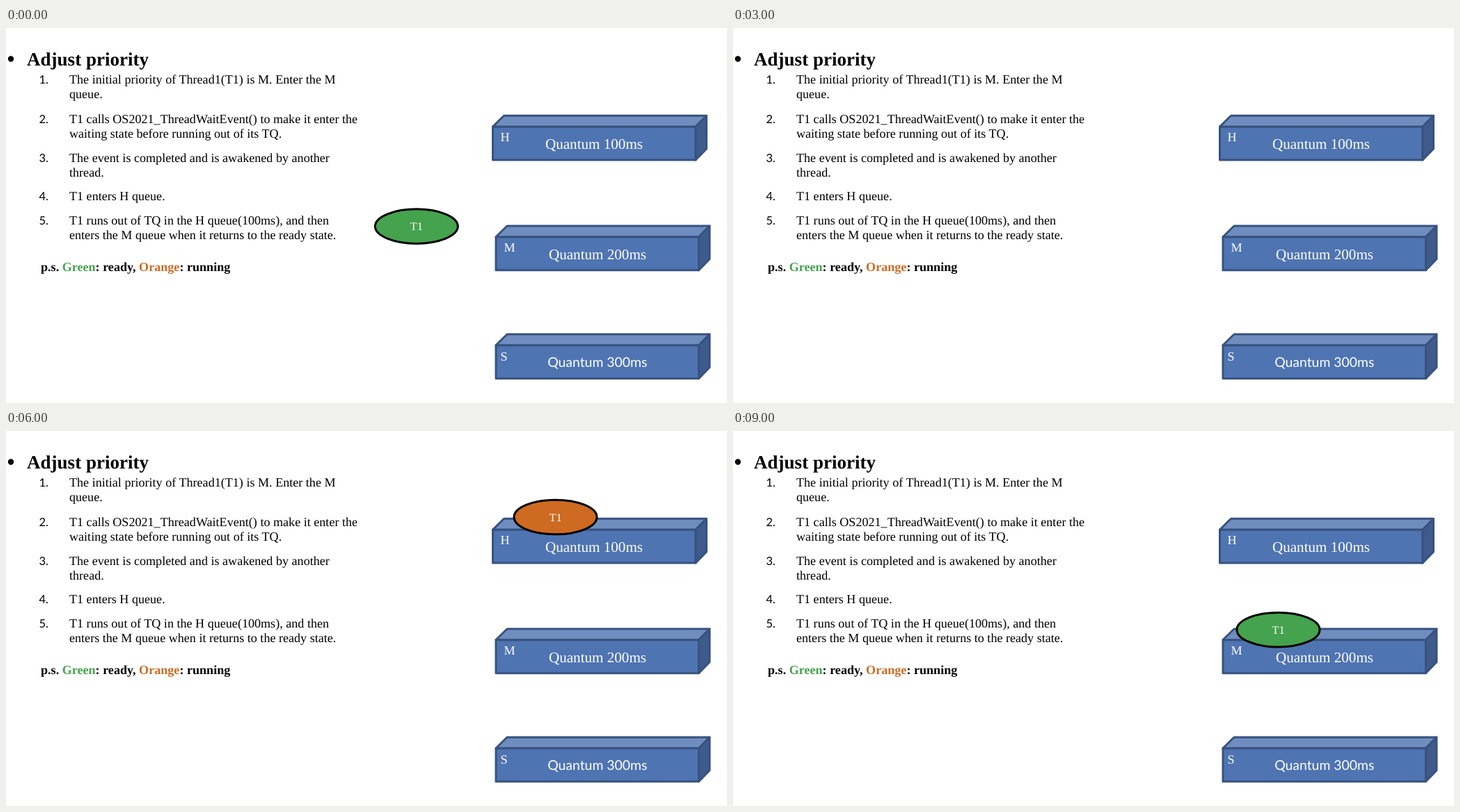
Recreate the animation shown at these times as an HTML page. Size 1036x540 px, loop 10000 ms.

```html
<!DOCTYPE html>
<html lang="en">
<head>
<meta charset="utf-8">
<title>Adjust priority</title>
<style>
  html, body { margin: 0; width: 100%; height: 100%; overflow: hidden; background: #fff; }
  svg { display: block; width: 1036px; height: 540px; text-rendering: geometricPrecision; }
  text { font-family: "Liberation Serif", "Times New Roman", serif; font-size: 18.1px; white-space: pre; }
  .sans { font-family: Lato, sans-serif; }
  .mid { text-anchor: middle; }
  .bold { font-weight: bold; }
</style>
</head>
<body>
<svg id="stage" viewBox="0 0 1036 540"></svg>
<script>
const GREEN = '#45a24e', ORANGE = '#ce6a22', GOLD = '#f4ba30', EDGE = '#38527f';
const stage = document.getElementById('stage');

function add(tag, attrs, parent = stage, content = '') {
  const el = document.createElementNS('http://www.w3.org/2000/svg', tag);
  for (const key in attrs) el.setAttribute(key, attrs[key]);
  el.textContent = content;
  parent.append(el);
  return el;
}

function label(x, y, content, { size = 18.1, fill = '#000', cls = '', parent = stage } = {}) {
  return add('text', { x, y, fill, class: cls, style: `font-size:${size}px` }, parent, content);
}

// Instructions
add('circle', { cx: 7, cy: 44.5, r: 4.2 });
label(30, 54, 'Adjust priority', { size: 27.05, cls: 'bold' });
[
  [79.7, 'The initial priority of Thread1(T1) is M. Enter the M', 'queue.'],
  [136.6, 'T1 calls OS2021_ThreadWaitEvent() to make it enter the', 'waiting state before running out of its TQ.'],
  [192.7, 'The event is completed and is awakened by another', 'thread.'],
  [248.2, 'T1 enters H queue.'],
  [282.5, 'T1 runs out of TQ in the H queue(100ms), and then', 'enters the M queue when it returns to the ready state.']
].forEach(([y, ...lines], i) => {
  label(47.5, y, `${i + 1}.`, { size: 16.5, cls: 'sans' });
  lines.forEach((line, n) => label(91, y + n * 21.7, line));
});
const note = label(50, 350, '', { cls: 'bold' });
[['p.s. '], ['Green', GREEN], [': ready, '], ['Orange', ORANGE], [': running']]
  .forEach(([part, fill = '#000']) => add('tspan', { fill }, note, part));

// Queues
function queue(x, y, name, nameX, nameY, quantum, textX, textY, font = {}) {
  const box = add('g', { transform: `translate(${x} ${y})`, stroke: EDGE, 'stroke-width': 3, 'stroke-linejoin': 'round' });
  add('path', { d: 'M0 0h291.5v48H0z', fill: '#4f74b2' }, box);
  add('path', { d: 'M0 0l16-15.7h291l-15.5 15.7z', fill: '#6f8ebf' }, box);
  add('path', { d: 'M291.5 0l15.5-15.7v47.7l-15.5 16z', fill: '#3f5b8b' }, box);
  label(nameX, nameY, name, { fill: '#fff' });
  label(textX, textY, quantum, { size: 21.1, fill: '#fff', cls: 'mid', ...font });
}
queue(699.5, 142, 'H', 710.5, 163, 'Quantum 100ms', 845, 174);
queue(704, 300.7, 'M', 715.5, 321.8, 'Quantum 200ms', 850, 332.7);
queue(704, 456.7, 'S', 710.5, 478.8, 'Quantum 300ms', 849.8, 488.3, { size: 19.4, cls: 'mid sans' });

// Thread
const thread = add('g', {});
const oval = add('ellipse', { rx: 59.5, ry: 24.8, stroke: '#000', 'stroke-width': 3 }, thread);
label(0, 5.6, 'T1', { size: 16.3, fill: '#fff', cls: 'mid', parent: thread });

// Star shape in thousandths of its width and height
const STAR = '500,269 672,0 655,247 851,206 773,339 977,377 815,485 1000,615 779,599 840,840 649,669 613,914 ' +
  '488,691 393,1000 357,723 220,816 262,645 6,675 172,545 0,399 214,353 17,106 339,293 387,106';

function burst(x, y, w, h, content, textX, textY) {
  const points = STAR.split(' ').map(p => {
    const [u, v] = p.split(',');
    return `${x + u * w / 1000},${y + v * h / 1000}`;
  }).join(' ');
  const group = add('g', {});
  add('polygon', { points, fill: GOLD, stroke: GOLD, 'stroke-width': 2, 'stroke-linejoin': 'round' }, group);
  label(textX, textY, content, { size: 15.05, cls: 'mid', parent: group });
  return group;
}
const waiting = burst(783, 236, 224, 43.5, 'Wait event', 893.3, 262);
const complete = burst(711, 5, 317, 93, 'Event complete', 867, 54.5);
const expired = burst(748, 71.5, 288, 60.5, 'runs out of TQ', 889.7, 105);
const bursts = [waiting, complete, expired];

// One step per second: thread x, y, colour, visible burst
const runM = [783.5, 283.6, ORANGE], runH = [789.5, 124, ORANGE], readyH = [789.5, 122.3, GREEN];
const STEPS = [
  { thread: [589.8, 285.6, GREEN] },
  { thread: runM },
  { thread: runM, burst: waiting },
  {},
  { burst: complete },
  { thread: readyH },
  { thread: runH },
  { thread: runH, burst: expired },
  { thread: readyH },
  { thread: [783.5, 286.2, GREEN] }
];

function show(el, visible) {
  el.setAttribute('visibility', visible ? 'visible' : 'hidden');
}

function draw(ms) {
  const step = STEPS[Math.floor(ms / 1000) % STEPS.length];
  show(thread, step.thread);
  if (step.thread) {
    const [x, y, colour] = step.thread;
    thread.setAttribute('transform', `translate(${x} ${y})`);
    oval.setAttribute('fill', colour);
  }
  bursts.forEach(b => show(b, b === step.burst));
}

const start = performance.now();
function tick() {
  draw(performance.now() - start);
  requestAnimationFrame(tick);
}
tick();
</script>
</body>
</html>
```
